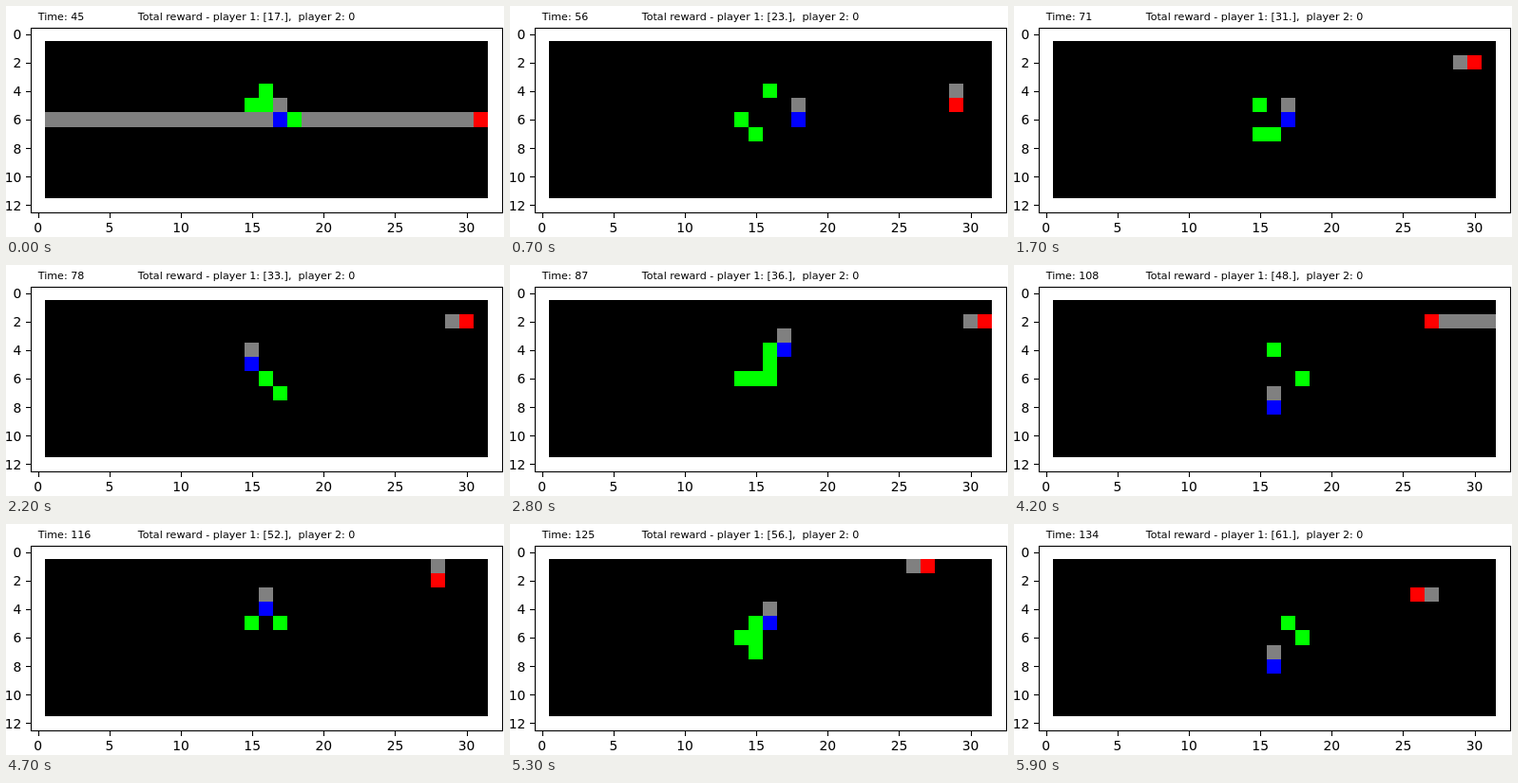
Write an HTML page that moves like this. It is 524x244 px and loops after 6000 ms.

```html
<!DOCTYPE html>
<html lang="en">
<head>
<meta charset="utf-8">
<title>Grid game</title>
<style>
  html, body { margin: 0; width: 100%; height: 100%; overflow: hidden; background: #fff; }
  svg { display: block; }
  text { font-family: "DejaVu Sans", sans-serif; font-size: 13.89px; fill: #000; white-space: pre; }
  .head { font-size: 11.11px; }
  line, .frame { stroke: #000; stroke-width: 1.1; fill: none; }
</style>
</head>
<body>
<svg width="524" height="244" viewBox="0 0 524 244">
  <g id="board" shape-rendering="crispEdges"></g>
  <rect class="frame" x="26.5" y="23.5" width="496" height="195"/>
  <g id="axes"></g>
  <text id="time" class="head" x="33.7" y="15"></text>
  <text id="score" class="head" x="138.8" y="15"></text>
</svg>
<script>
const LOOP = 6000, STEP = 100, FIRST = 45;
const CELL = 15.03, LEFT = 25.9, TOP = 22.3, COLS = 31, ROWS = 11;
const GRAY = '#808080';
const DIRS = { L: [-1, 0], R: [1, 0], U: [0, -1], D: [0, 1] };
const $ = id => document.getElementById(id);
const px = c => Math.round(LEFT + c * CELL);
const py = r => Math.round(TOP + r * CELL);
const cells = s => s.split(' ');

// Each scene: tick, score, apples, then the cells the blue player visits next.
const scenes = [
  [45, 17, '16,4 15,5 16,5 18,6', '17,6 15,5 16,8 18,6'],
  [56, 23, '16,4 14,6 15,7', '18,6 16,4 14,6 17,5 17,6'],
  [71, 31, '15,5 15,7 16,7', '17,6 16,8 15,7 15,5 17,7 17,4'],
  [87, 36, '16,4 16,5 14,6 15,6 16,6', '17,4 16,6 14,6 16,8 17,7 17,5 15,5 16,8'],
  [108, 48, '16,4 18,6', '16,8 18,6 16,4 17,5 16,7 16,5'],
  [125, 56, '15,5 14,6 15,6 15,7', '16,5 15,5 15,7 14,6 16,8'],
  [134, 61, '17,5 18,6', '16,8']
].map(([tick, score, apples, route]) =>
  ({ tick, score, apples: cells(apples), stops: cells(route) }));

// The red player's stops: tick, column, row, facing.
const redStops = [
  [45, 31, 6, 'L'], [47, 31, 6, 'U'], [52, 30, 4, 'U'], [56, 29, 5, 'U'],
  [60, 30, 5, 'U'], [64, 31, 4, 'U'], [68, 30, 3, 'U'], [71, 30, 2, 'L'],
  [79, 30, 2, 'U'], [83, 31, 3, 'U'], [87, 31, 2, 'L'], [92, 30, 2, 'L'],
  [96, 29, 3, 'D'], [101, 28, 2, 'R'], [108, 27, 2, 'R'], [112, 27, 3, 'U'],
  [117, 28, 2, 'L'], [121, 28, 2, 'L'], [125, 27, 1, 'L'], [128, 27, 2, 'D'],
  [131, 26, 3, 'R'], [134, 26, 3, 'R']
];
const shots = [45, 74, 108, 132];

// One cell per tick, sideways first.
function walk([x, y], [tx, ty], n) {
  const dx = Math.min(n, Math.abs(tx - x));
  const dy = Math.min(n - dx, Math.abs(ty - y));
  return [x + dx * Math.sign(tx - x), y + dy * Math.sign(ty - y)];
}

function makePath(stops) {
  const path = [stops[0]], arrivals = [0];
  for (const stop of stops.slice(1)) {
    const from = path[path.length - 1].split(',').map(Number);
    const to = stop.split(',').map(Number);
    const len = Math.abs(to[0] - from[0]) + Math.abs(to[1] - from[1]);
    for (let i = 1; i <= len; i++) path.push(walk(from, to, i).join());
    arrivals.push(path.length - 1);
  }
  return { path, arrivals };
}
scenes.forEach(s => Object.assign(s, makePath(s.stops)));

function spawnShare(cell) {
  const [x, y] = cell.split(',').map(Number);
  return 0.35 + 0.6 * ((x * 7 + y * 13) % 10) / 10;
}

function applesAt(scene, next, age) {
  if (!next || age === 0) return scene.apples;
  const span = next.tick - scene.tick, list = new Set();
  for (const c of scene.apples) {
    const hit = scene.path.indexOf(c);
    const gone = hit >= 0 ? hit : next.apples.includes(c) ? span : span / 2;
    if (age < gone) list.add(c);
  }
  for (const c of next.apples) {
    if (scene.apples.includes(c) && !scene.path.includes(c)) continue;
    if (age >= Math.max(spawnShare(c) * span, scene.path.lastIndexOf(c) + 1)) list.add(c);
  }
  scene.stops.forEach((c, i) => {
    const at = scene.arrivals[i];
    if (age < at && age >= at - 4) list.add(c);
  });
  return [...list];
}

function redAt(tick) {
  const i = redStops.findLastIndex(s => s[0] <= tick);
  const [t, x, y, face] = redStops[i];
  const [, tx, ty] = redStops[i + 1] || redStops[i];
  return [...walk([x, y], [tx, ty], tick - t), face];
}

function block(x, y, fill, w = 1, h = 1) {
  return `<rect x="${px(x)}" y="${py(y)}" width="${px(x + w) - px(x)}" ` +
    `height="${py(y + h) - py(y)}" fill="${fill}"/>`;
}

function front(x, y, face, shoot) {
  if (shoot) return face === 'L' ? block(1, y, GRAY, x - 1) : block(x + 1, y, GRAY, COLS - x);
  const [dx, dy] = DIRS[face], fx = x + dx, fy = y + dy;
  return fx < 1 || fx > COLS || fy < 1 || fy > ROWS ? '' : block(fx, fy, GRAY);
}

function drawAxes() {
  let out = '';
  for (let v = 0; v <= 30; v += 5) {
    const c = LEFT + (v + 0.5) * CELL + 0.3, x = Math.round(c) + 0.5;
    out += `<line x1="${x}" x2="${x}" y1="219" y2="224"/>` +
      `<text x="${c}" y="239" text-anchor="middle">${v}</text>`;
  }
  for (let v = 0; v <= 12; v += 2) {
    const c = TOP + (v + 0.5) * CELL + 0.3, y = Math.round(c) + 0.5;
    out += `<line x1="21" x2="26" y1="${y}" y2="${y}"/>` +
      `<text x="16.4" y="${Math.round(c + 5.2)}" text-anchor="end">${v}</text>`;
  }
  $('axes').innerHTML = out;
}

function draw(tick) {
  const i = scenes.findLastIndex(s => s.tick <= tick);
  const scene = scenes[i], next = scenes[i + 1], age = tick - scene.tick;
  const share = next ? age / (next.tick - scene.tick) : 0;
  const score = Math.round(scene.score + share * (next ? next.score - scene.score : 0));
  const blue = scene.path[Math.min(age, scene.path.length - 1)].split(',').map(Number);
  const [rx, ry, face] = redAt(tick);

  $('board').innerHTML = block(1, 1, '#000', COLS, ROWS) +
    front(rx, ry, face, shots.includes(tick)) + front(...blue, 'U') +
    applesAt(scene, next, age).map(c => block(...c.split(',').map(Number), '#0f0')).join('') +
    block(rx, ry, '#f00') + block(...blue, '#00f');
  $('time').textContent = `Time: ${tick}`;
  $('score').textContent = `Total reward - player 1: [${score}.],  player 2: 0`;
}

let shown = -1;
function update() {
  const n = Math.floor(performance.now() % LOOP / STEP);
  const tick = Math.ceil(FIRST + 1.5 * n);
  if (tick !== shown) draw(shown = tick);
  requestAnimationFrame(update);
}
drawAxes();
update();
</script>
</body>
</html>
```
